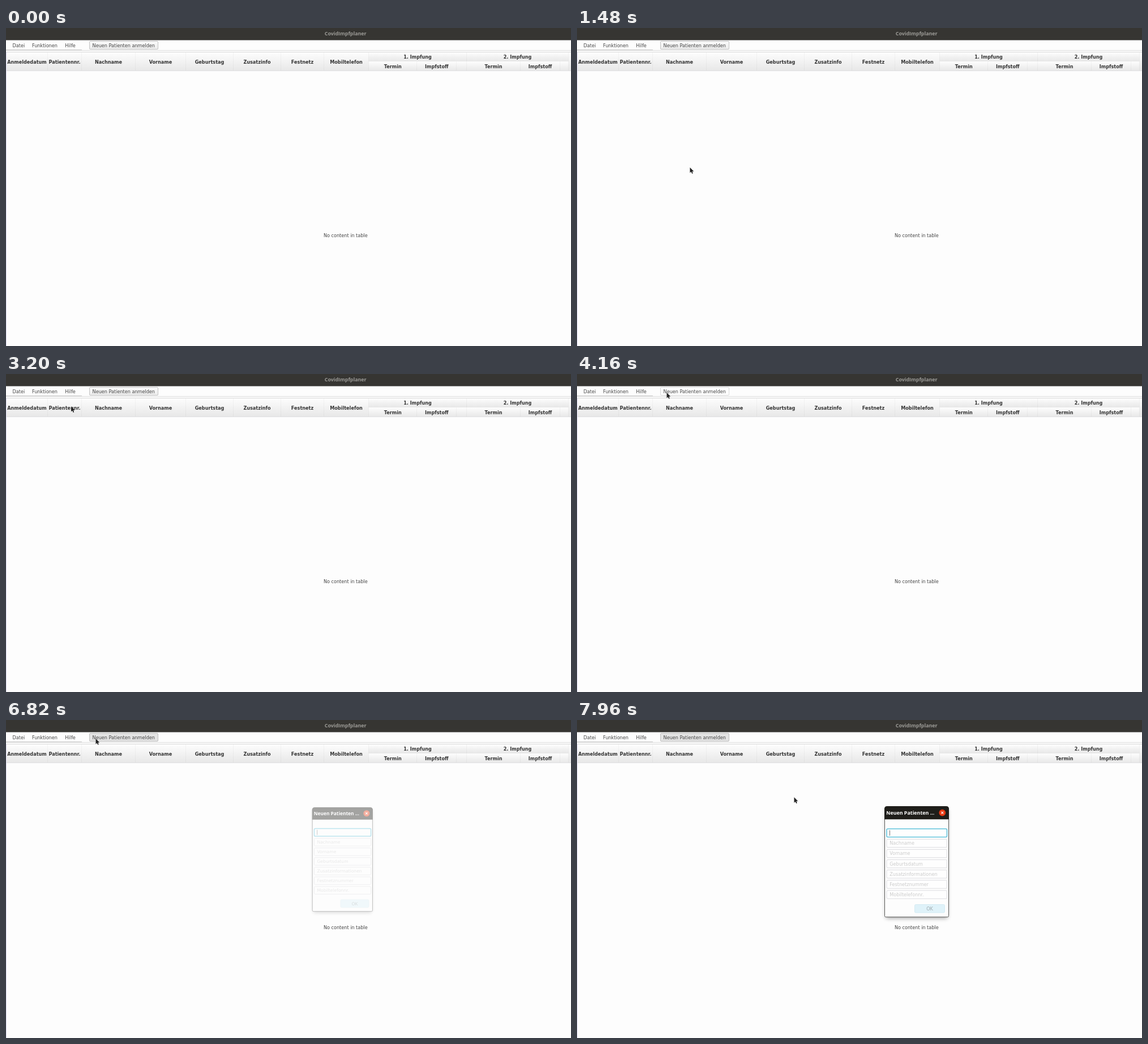
An HTML page that plays this animation: 998 px wide and 561 px high, repeating every 8 s.

```html
<!DOCTYPE html>
<html lang="de">
<head>
<meta charset="utf-8">
<title>CovidImpfplaner</title>
<style>
  html, body { margin: 0; width: 100%; height: 100%; overflow: hidden; background: #fdfdfd; }
  svg { display: block; width: 998px; height: 561px; }
  text { font: 8.12px "DejaVu Sans", sans-serif; fill: #444; white-space: pre; }
  .mid { text-anchor: middle; }
  .head { font-weight: bold; fill: #333; }
  .title { font: bold 8.9px "Open Sans", "Noto Sans", sans-serif; fill: #fff; }
  .bar { fill: #363532; }
  .bar + .title { fill: #9c9b97; }
  .active .bar { fill: #1e1d19; }
  .active .title { fill: #f4f4f2; }
  .button { fill: url(#face); stroke: #c4c4c4; }
  .button.hover { fill: #fefefe; stroke: #dadada; }
  .button.pressed { fill: #e3e3e3; stroke: #c0c0c0; }
  .field { fill: #fefefe; stroke: #dcdce0; }
  .prompt { fill: #cbcbcb; }
  .shadow { filter: blur(3.5px); }
</style>
</head>
<body>
<svg viewBox="0 0 998 561">
  <defs>
    <linearGradient id="face" x2="0" y2="1">
      <stop stop-color="#fbfbfb"/><stop offset="1" stop-color="#ebebeb"/>
    </linearGradient>
    <linearGradient id="header" x2="0" y2="1">
      <stop stop-color="#fdfdfd"/><stop offset="1" stop-color="#e7e7e7"/>
    </linearGradient>
    <linearGradient id="rule" x2="0" y2="1">
      <stop stop-color="#ececec"/><stop offset="1" stop-color="#d6d6d6"/>
    </linearGradient>
  </defs>

  <rect width="998" height="561" fill="#fdfdfd"/>
  <g id="titlebar">
    <rect class="bar" width="998" height="21.5"/>
    <text class="title mid" x="599.7" y="13.2">CovidImpfplaner</text>
  </g>

  <text x="11.6" y="33.7">Datei</text>
  <text x="46" y="33.7">Funktionen</text>
  <text x="104.3" y="33.7">Hilfe</text>
  <path d="M0 38.5H134" stroke="#cacaca"/>
  <path d="M0 39.5H998" stroke="#dcdcdc"/>
  <rect id="button" class="button" x="147.5" y="23.5" width="121" height="14" rx="1.5"/>
  <text class="mid" x="207.8" y="33.7">Neuen Patienten anmelden</text>

  <g id="table"></g>
  <path d="M0 42.5H998" stroke="#d8d8d8"/>
  <path d="M0 75.5H998" stroke="#e0e0e2"/>
  <path d="M.5 42V561" stroke="#dcdaf0"/>
  <text class="mid" x="599.8" y="368.8">No content in table</text>

  <g id="dialog">
    <rect class="shadow" x="2" y="5" width="110" height="193" rx="4" fill="#000" opacity=".35"/>
    <rect x=".5" y="2.5" width="113" height="193" rx="2" fill="#fdfdfd" stroke="#5c5c5a"/>
    <path d="M0 23.3V5Q0 0 5 0H109Q114 0 114 5V23.3Z" fill="#1f1e1a"/>
    <text class="title" x="3.2" y="15.2">Neuen Patienten ...</text>
    <circle cx="102.3" cy="11.6" r="5.9" fill="#e63710"/>
    <path d="M100.3 9.6l4 4m0-4l-4 4" stroke="#fff" stroke-width="1.1"/>
    <g id="fields"></g>
    <rect x="4" y="40" width="106.5" height="14.5" rx="2" fill="#fefefe" stroke="#62c3dc" stroke-width="1.6"/>
    <path d="M9.5 42.5V52" stroke="#666" stroke-width=".9"/>
    <rect x="53.5" y="173.5" width="53" height="14.5" rx="2" fill="#dff2f9" stroke="#d5ebf3"/>
    <text class="mid" x="80" y="183.8" style="fill:#a0abb0">OK</text>
  </g>

  <path id="cursor" d="M0 0V9.6L2.2 7.6L3.7 11L5.3 10.3L3.9 7H6.8Z"
        fill="#222" stroke="#fff" stroke-width=".7" paint-order="stroke"/>
</svg>
<script>
  const $ = id => document.getElementById(id);
  const svgNS = "http://www.w3.org/2000/svg";

  function add(parent, tag, attrs, label) {
    const el = document.createElementNS(svgNS, tag);
    for (const key in attrs) el.setAttribute(key, attrs[key]);
    if (label) el.textContent = label;
    parent.append(el);
  }

  const TOP = 43, SPLIT = 59, BOTTOM = 76;

  // One header cell: gradient, right-hand rule, centred label
  function cell(left, right, top, bottom, label) {
    const table = $("table"), height = bottom - top;
    add(table, "rect", { x: left, y: top, width: right - left, height, fill: "url(#header)" });
    add(table, "rect", { x: right - 0.5, y: top, width: 1, height, fill: "url(#rule)" });
    if (label) add(table, "text", { class: "head mid", x: (left + right) / 2, y: (top + bottom) / 2 + 3.2 }, label);
  }

  const columns = [
    ["Anmeldedatum", 73.5], ["Patientennr.", 133.5], ["Nachname", 228.5], ["Vorname", 317.5],
    ["Geburtstag", 401.5], ["Zusatzinfo", 485.5], ["Festnetz", 561.5], ["Mobiltelefon", 640.5]
  ];
  let left = 0.5;
  for (const [label, right] of columns) {
    cell(left, right, TOP, BOTTOM, label);
    left = right;
  }
  const groups = [["1. Impfung", 640.5, 726, 795.5, 813.5], ["2. Impfung", 813.5, 908.5, 978.5, 993.5]];
  for (const [label, a, b, c, d] of groups) {
    cell(a, d, TOP, SPLIT, label);
    cell(a, b, SPLIT, BOTTOM, "Termin");
    cell(b, c, SPLIT, BOTTOM, "Impfstoff");
    cell(c, d, SPLIT, BOTTOM);
  }
  cell(993.5, 999, TOP, BOTTOM);

  const prompts = ["Nachname", "Vorname", "Geburtsdatum", "Zusatzinformationen", "Festnetznummer", "Mobiltelefonnr."];
  prompts.forEach((label, i) => {
    const y = 65.5 + i * 18.1;
    add($("fields"), "rect", { class: "field", x: 4, y: y - 7.2, width: 106.5, height: 14.4, rx: 2 });
    add($("fields"), "text", { class: "prompt", x: 9.3, y: y + 2.8 }, label);
  });

  // Pointer way-points: step, x, y
  const path = [
    [0, 969, 401], [6, 608, 330], [12, 366, 291], [17, 255.5, 266], [21, 199.5, 246],
    [28, 138, 205], [35, 98, 160], [44, 94, 115], [53, 99, 79.5], [59, 115, 57],
    [65, 132, 40], [71, 145, 33], [75, 152, 36], [79, 158.5, 32.8]
  ];

  // Hermite curve through the way-points, tangents from the neighbours
  function along(step) {
    const last = path.length - 1;
    if (step >= path[last][0]) return path[last].slice(1);
    let i = 0;
    while (step >= path[i + 1][0]) i++;
    const a = path[i], b = path[i + 1], span = b[0] - a[0], u = (step - a[0]) / span;
    const slope = (j, axis) => {
      const p = path[Math.max(j - 1, 0)], q = path[Math.min(j + 1, last)];
      return (q[axis] - p[axis]) / (q[0] - p[0]);
    };
    return [1, 2].map(axis => {
      const ease = u * u * (3 - 2 * u);
      return a[axis] + (b[axis] - a[axis]) * ease
        + span * u * (1 - u) * ((1 - u) * slope(i, axis) - u * slope(i + 1, axis));
    });
  }

  function stepAt(ms) {
    const t = ms - 500, rest = t % 140;
    return 3 * Math.floor(t / 140) + (rest < 20 ? 0 : rest < 40 ? 1 : 2);
  }

  const HOVER = 72, PRESS = 120, RELEASE = 134, SETTLE = 141, LEAVE = 154;

  function draw(ms) {
    const step = ms < 500 ? -1 : stepAt(ms);

    $("cursor").style.display = step < 0 ? "none" : "";
    if (step >= 0) {
      let [x, y] = along(step);
      if (step >= LEAVE) {
        const p = Math.min(1, (step - LEAVE + 1) / 8) ** 1.4;
        x += 225 * p;
        y += 103.5 * p;
      }
      $("cursor").setAttribute("transform", `translate(${x} ${y})`);
    }

    $("titlebar").setAttribute("class", step >= PRESS && step < RELEASE ? "active" : "");
    $("button").setAttribute("class", "button" + (step > PRESS ? " pressed" : step >= HOVER ? " hover" : ""));

    const shown = Math.max(0, Math.min(1, (step - RELEASE) / 5));
    const scale = 0.9 + 0.1 * shown;
    const [dx, dy] = step < SETTLE ? [537.3, 148] : [543, 152];
    $("dialog").setAttribute("opacity", shown);
    $("dialog").setAttribute("transform",
      `translate(${dx + 57 * (1 - scale)} ${dy + 98 * (1 - scale)}) scale(${scale})`);
  }

  function tick() {
    draw(performance.now() % 8000);
    requestAnimationFrame(tick);
  }
  tick();
</script>
</body>
</html>
```
